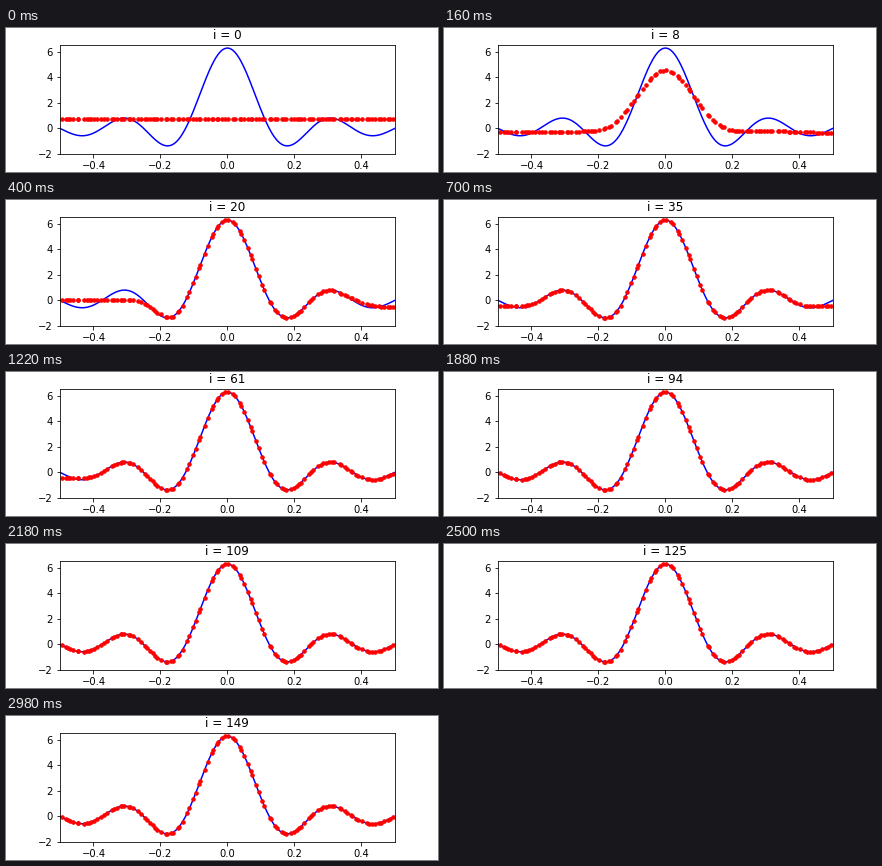
These frames come from a looping animation (432 px wide and 144 px high, 3 s). A matplotlib script:

```python
import numpy as np
import matplotlib.pyplot as plt
from matplotlib.animation import FuncAnimation

FRAMES, STEP, SAMPLES = 150, 20, 110

plt.rcParams.update({"font.family": "DejaVu Sans", "font.size": 10})


def target(x):
    """Damped ripple with its peak of 2 pi at zero."""
    return 2 * np.pi * np.sinc(8 * x)


def ease(x, lo, hi):
    t = np.clip((x - lo) / (hi - lo), 0, 1)
    return t * t * (3 - 2 * t)


def mix(a, b, w):
    return a + (b - a) * w


def ramp(x, start, end, at, width):
    """A soft step from start to end, centred at one place."""
    return mix(start, end, 1 / (1 + np.exp((at - x) / width)))


# samples spread evenly, each at random within its own slot
rng = np.random.default_rng(7)
xs = (np.arange(SAMPLES) + rng.random(SAMPLES)) / SAMPLES - 0.5
true = target(xs)


def with_tails(left, right, inner, outer):
    """The true curve between the two inner edges, soft tails beyond."""
    y = mix(left, true, ease(xs, -inner, 0.03 - inner))
    return mix(y, right, ease(xs, outer, outer + 0.04))


# the fit first finds the peak, then the side lobes, then the two ends
peak = -0.3 + 4.6 * np.exp(-(xs / 0.12) ** 2)
early = with_tails(ramp(xs, 0.06, -1.36, -0.225, 0.018),
                   ramp(xs, 0.81, -0.55, 0.375, 0.028), 0.20, 0.30)
lobes = with_tails(ramp(xs, -0.47, 0.78, -0.365, 0.018),
                   ramp(xs, 0.83, -0.47, 0.365, 0.018), 0.34, 0.32)
done = np.where(xs > 0, 66, 94)


def fit(i):
    y = mix(0.73, peak, ease(i, 0, 8))
    y = mix(y, early, ease(i, 5, 19))
    y = mix(y, lobes, ease(i, 20, 35))
    return mix(y, true, ease(i, done - 30, done))


fig, ax = plt.subplots(figsize=(6, 2), dpi=72)
fig.subplots_adjust(left=0.125, right=0.9, bottom=0.125, top=0.88)
grid = np.linspace(-0.5, 0.5, 400)
ax.plot(grid, target(grid), "b")
dots, = ax.plot(xs, true, "r.", markersize=7)
ax.set_xlim(-0.5, 0.5)
ax.set_ylim(-2, 6.5)
title = ax.set_title("i = 0")


def draw(i):
    dots.set_ydata(fit(i))
    title.set_text(f"i = {i}")
    return dots, title


anim = FuncAnimation(fig, draw, frames=FRAMES, interval=STEP, repeat=True,
                     repeat_delay=0)
plt.show()
```
